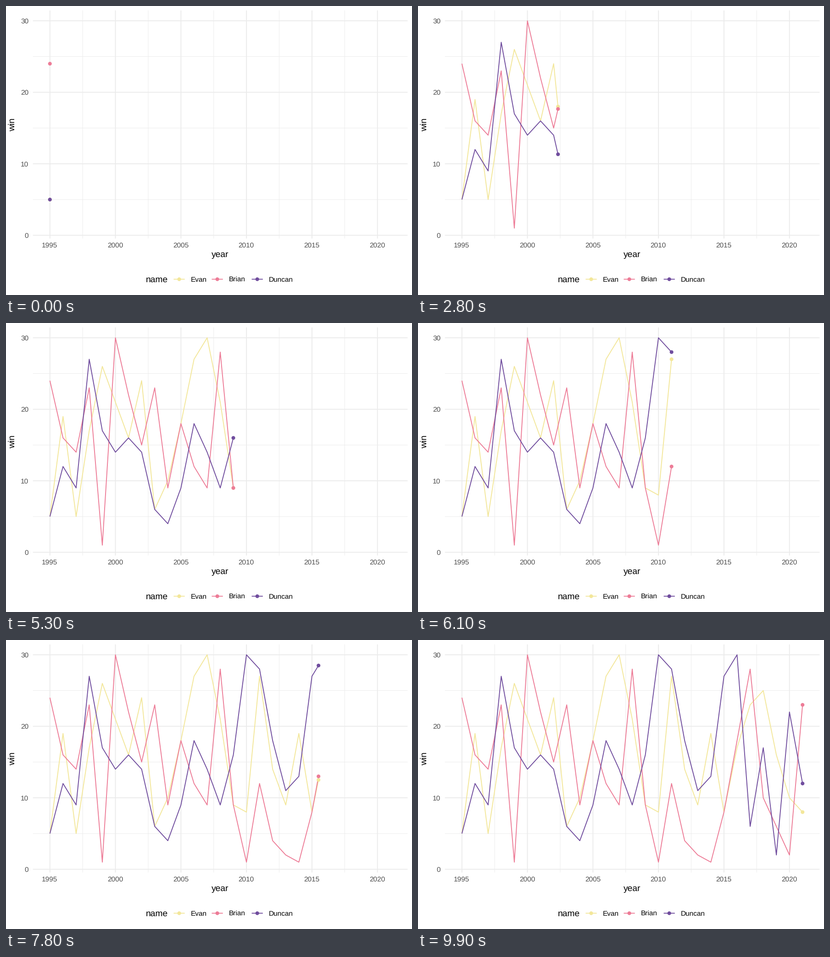
A matplotlib script for the animation above (10000 ms loop, 885 by 632 pixels).

```python
import numpy as np
import matplotlib.pyplot as plt
from matplotlib.animation import FuncAnimation
from matplotlib.patches import Circle

plt.rcParams.update({"font.family": "Liberation Sans", "text.hinting": "none"})

W, H, DPI = 885, 632, 100
FRAMES = 100
PX = 72 / DPI                      # points per pixel
LINE, RADIUS = 1.87, 4.05
TITLE, LABEL = 19.31, 15.45        # font sizes in pixels
LEFT, RIGHT, TOP, BOTTOM = 58.6, 875.4, 9.66, 508.5

SERIES = {
    "Evan": ("#F3E79A", [5, 19, 5, 17, 26, 21, 16, 24, 6, 10, 18, 27, 30, 21,
                         9, 8, 27, 14, 9, 19, 8, 17, 23, 25, 16, 10, 8]),
    "Brian": ("#ED7C97", [24, 16, 14, 23, 1, 30, 22, 15, 23, 9, 18, 12, 9, 28,
                          9, 1, 12, 4, 2, 1, 8, 18, 28, 10, 6, 2, 23]),
    "Duncan": ("#704D9E", [5, 12, 9, 27, 17, 14, 16, 14, 6, 4, 9, 18, 14, 9,
                           16, 30, 28, 18, 11, 13, 27, 30, 6, 17, 2, 22, 12]),
}
STEPS = np.arange(27)              # years since 1995
KEYS = np.round(STEPS * (FRAMES - 1) / STEPS[-1])


def px(year):
    """Horizontal pixel of a year, with 5 % padding on both sides."""
    return LEFT + (RIGHT - LEFT) * (year - 1995 + 1.3) / 28.6


def py(win):
    return BOTTOM - (BOTTOM - TOP) * (win - 1 + 1.45) / 31.9


fig = plt.figure(figsize=(W / DPI, H / DPI), dpi=DPI, facecolor="white")
ax = fig.add_axes([0, 0, 1, 1])
ax.set_xlim(0, W)
ax.set_ylim(H, 0)
ax.axis("off")


def line(x, y, color, width=LINE, z=1):
    return ax.plot(x, y, color=color, lw=width * PX, zorder=z, snap=False,
                   solid_capstyle="butt", solid_joinstyle="round")[0]


def dot(x, y, color, z=4):
    return ax.add_patch(Circle((x, y), RADIUS, fc=color, lw=0, zorder=z))


def text(x, y, s, size, color="black", ha="left", **kw):
    ax.text(x, y, s, fontsize=size * PX, color=color, ha=ha,
            va=kw.pop("va", "baseline"), **kw)


def grid(years, wins, width, z):
    for year in years:
        line([px(year)] * 2, [TOP, BOTTOM], "#EBEBEB", width, z)
    for win in wins:
        line([LEFT, RIGHT], [py(win)] * 2, "#EBEBEB", width, z)


years, wins = range(1995, 2021, 5), range(0, 31, 10)
grid(np.arange(1997.5, 2020, 5), (5, 15, 25), LINE / 2, 1)
grid(years, wins, LINE, 2)

for year in years:
    text(px(year) - 0.5, 527.9, str(year), LABEL, "#4D4D4D", "center")
for win in wins:
    text(49.3, py(win) + 5.4, str(win), LABEL, "#4D4D4D", "right")
text((LEFT + RIGHT) / 2, 549.2, "year", TITLE, ha="center")
text(23, (TOP + BOTTOM) / 2, "win", TITLE, ha="right", va="center", rotation=90)

# legend
KEY_Y = 597.5
text(305, KEY_Y + 6.6, "name", TITLE)
for x, (name, (color, _)) in zip((377.5, 460.6, 547.7), SERIES.items()):
    line([x - 12.13, x + 12.13], [KEY_Y] * 2, color)
    dot(x, KEY_Y, color)
    text(x + 24.83, KEY_Y + 5.3, name, LABEL)

tracks = []
for color, values in SERIES.values():
    tracks.append((np.array(values), line([], [], color, z=3),
                   dot(-50, -50, color)))


def update(frame):
    now = np.interp(frame, KEYS, STEPS)
    past = STEPS[STEPS < now]
    t = np.append(past, now)
    artists = []
    for values, path, head in tracks:
        x, y = px(1995 + t), py(np.interp(t, STEPS, values))
        path.set_data(x, y)
        head.center = x[-1], y[-1]
        artists += [path, head]
    return artists


anim = FuncAnimation(fig, update, frames=FRAMES, interval=100,
                     repeat=True, repeat_delay=0, blit=False)
plt.show()
```
